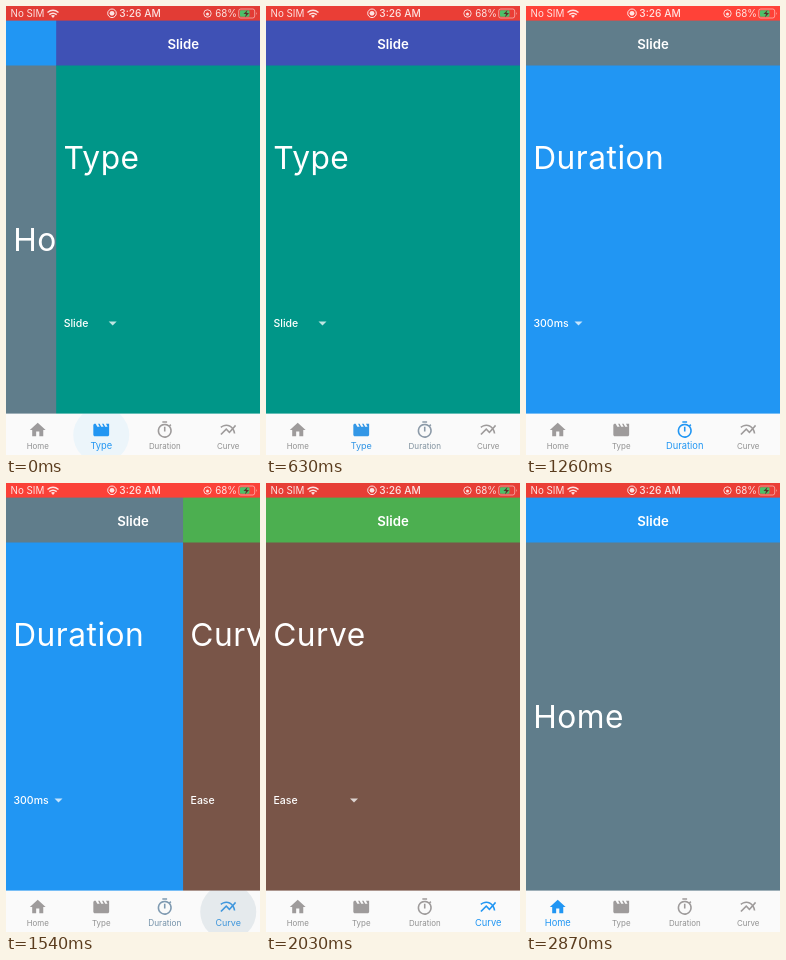
Animation, 254 px wide and 449 px high, one loop 2940 ms. Source, as an HTML page:

```html
<!DOCTYPE html>
<html lang="en">
<head>
<meta charset="utf-8">
<title>Slide transitions</title>
<style>
  html, body { margin: 0; width: 100%; height: 100%; overflow: hidden; background: #fafafa; }
  svg { display: block; width: 254px; height: 449px; font-family: Inter, "Open Sans", sans-serif; }
  .heading { font-size: 31.7px; letter-spacing: .5px; }
</style>
</head>
<body>
<svg viewBox="0 0 254 449">
  <defs><clipPath id="navClip"><rect y="407.6" width="254" height="42"/></clipPath></defs>
  <g id="pages"></g>
  <rect id="status" width="254" height="14.6"/>
  <g fill="#fff" fill-opacity=".85" font-size="9.8">
    <text x="4.5" y="11">No SIM</text>
    <text x="134" y="11" text-anchor="middle" font-weight="500" font-size="10.2">3:26 AM</text>
    <text x="231" y="11" text-anchor="end">68%</text>
    <circle cx="106" cy="7.3" r="2.4"/>
    <path d="M47 12l-2-2.2q2-1.6 4 0z"/>
    <path d="M250 6v3q1-1.5 0-3z"/>
    <circle cx="201.5" cy="8" r="1.5"/>
  </g>
  <rect x="234" y="4.2" width="9.5" height="6.6" rx="1" fill="#4cc068"/>
  <path d="M241.500 4l-4 4h2.500l-1 3.400 4-4.400h-2.500z" fill="#5a3029"/>
  <g fill="none" stroke="#fff" stroke-opacity=".85">
    <circle cx="106" cy="7.3" r="4.3"/>
    <path d="M41.5 6.5q5.5-4.5 11 0M43.3 8.7q3.7-2.9 7.4 0" stroke-width="1.5"/>
    <circle cx="201.5" cy="7.5" r="3.7" stroke-width=".9"/>
    <rect x="232.7" y="3" width="16" height="9" rx="2" stroke-width=".8" stroke-opacity=".6"/>
  </g>
  <rect y="407.6" width="254" height="42" fill="#fafafa"/>
  <g clip-path="url(#navClip)"><circle id="ripple" cy="429"/></g>
  <g id="nav"></g>
</svg>
<script>
const LOOP = 2940, SLIDE = 300, WIDTH = 254;
const $ = id => document.getElementById(id);

const pages = [
  { name: 'Home', bar: '#2196f3', body: '#607d8b', y: 245,
    icon: 'M10 20v-6h4v6h5v-8h3L12 3 2 12h3v8z' },
  { name: 'Type', bar: '#3f51b5', body: '#009688', y: 163, choice: 'Slide', arrow: 56.5,
    icon: 'M18 4l2 4h-3l-2-4h-2l2 4h-3l-2-4H8l2 4H7L5 4H4c-1.1 0-2 .9-2 2v12c0 1.1.9 2 2 2h16c1.1 0 2-.9 2-2V4z' },
  { name: 'Duration', bar: '#607d8b', body: '#2196f3', y: 163, choice: '300ms', arrow: 52.5,
    icon: 'M15 1H9v2h6zM11 14h2V8h-2zM19.03 7.39l1.42-1.42-1.41-1.41-1.42 1.42A9 9 0 1 0 19.03 7.39zM12 20a7 7 0 1 1 0-14 7 7 0 0 1 0 14z' },
  { name: 'Curve', bar: '#4caf50', body: '#795548', y: 163, choice: 'Ease', arrow: 88,
    icon: 'M22 6.92l-1.41-1.41-2.85 3.21C15.68 6.4 12.83 5 9.61 5 6.72 5 4.07 6.16 2 8l1.42 1.42C5.12 7.93 7.27 7 9.61 7c2.74 0 5.09 1.26 6.77 3.24l-2.88 3.24-4-4L2 16.99l1.5 1.5 6-6.01 4 4 4.05-4.55c.75 1.35 1.25 2.9 1.44 4.55H21c-.22-2.3-.95-4.39-2.04-6.14z' }
];

// Each tap slides page "to" over page "from"; the first is already under way.
const taps = [
  { at: -149, from: 0, to: 1 },
  { at: 635, from: 1, to: 2 },
  { at: 1480, from: 2, to: 3 },
  { at: 2417, from: 3, to: 0 }
];

const dropdown = p => !p.choice ? '' : `
  <text x="7.5" y="321" font-size="10.5" font-weight="500">${p.choice}</text>
  <path d="M${p.arrow - 4} 315.5h8l-4 4z" fill-opacity=".75"/>`;

$('pages').innerHTML = pages.map(p => `<g fill="#fff">
  <rect y="59" width="254" height="349" fill="${p.body}"/>
  <rect y="14" width="254" height="45.5" fill="${p.bar}"/>
  <text x="127" y="42.9" font-size="13.2" font-weight="600" text-anchor="middle">Slide</text>
  <text class="heading" x="7.2" y="${p.y}">${p.name}</text>${dropdown(p)}</g>`).join('');

const tabX = i => 31.75 + i * 63.5;
$('nav').innerHTML = pages.map((p, i) => `<g>
  <path transform="translate(${tabX(i) - 9.5} 414.5) scale(.79)" d="${p.icon}"/>
  <text x="${tabX(i)}" text-anchor="middle">${p.name}</text></g>`).join('');

const views = [...$('pages').children], tabs = [...$('nav').children];
const clamp = v => Math.max(0, Math.min(1, v));
const mix = (a, b, k) => `rgb(${a.map((v, i) => Math.round(v + (b[i] - v) * k))})`;

// cubic-bezier(.25, .1, .25, 1)
function ease(x) {
  if (x <= 0 || x >= 1) return clamp(x);
  const bez = (s, a, b) => 3 * a * s * (1 - s) ** 2 + 3 * b * s * s * (1 - s) + s ** 3;
  let lo = 0, hi = 1;
  for (let i = 0; i < 20; i++) {
    const mid = (lo + hi) / 2;
    if (bez(mid, .25, .25) < x) lo = mid; else hi = mid;
  }
  return bez(lo, .1, 1);
}

function drawTab(tab, k) {
  const [icon, label] = tab.children;
  icon.setAttribute('fill', mix([158, 155, 155], [33, 150, 243], k));
  label.setAttribute('fill', mix([145, 145, 145], [33, 150, 243], k));
  label.setAttribute('font-size', 7.9 + 1.4 * k);
  label.setAttribute('y', 443 - .3 * k);
}

function drawRipple(age, tab) {
  const ripple = $('ripple');
  ripple.setAttribute('cx', tabX(tab));
  ripple.setAttribute('r', 8 + 20 * clamp(age / 35));
  ripple.setAttribute('fill', mix([90, 90, 90], [33, 170, 243], clamp((age - 30) / 100)));
  ripple.setAttribute('fill-opacity', age < 0 ? 0 : .13 * clamp((250 - age) / 210));
}

function draw(t) {
  const { at, from, to } = taps.filter(tap => t >= tap.at - 30).pop();
  const age = t - at;
  const shift = (1 - ease(age / SLIDE)) * WIDTH * (to > from ? 1 : -1);
  const select = ease((age + 30) / 200);
  views.forEach((view, i) => {
    view.setAttribute('display', i === from || i === to ? 'inline' : 'none');
    view.setAttribute('transform', `translate(${i === to ? shift : 0} 0)`);
  });
  // The entering page is always on top.
  const top = views[to];
  if (top.parentNode.lastChild !== top) top.parentNode.append(top);

  tabs.forEach((tab, i) => drawTab(tab, i === to ? select : i === from ? 1 - select : 0));
  drawRipple(age, to);
  const glow = .5 + .5 * Math.cos((t - 1300) / 2200 * 2 * Math.PI);
  $('status').setAttribute('fill', mix([223, 60, 53], [255, 66, 56], glow));
}

const start = performance.now();
function tick() {
  draw((performance.now() - start) % LOOP);
  requestAnimationFrame(tick);
}
tick();
</script>
</body>
</html>
```
